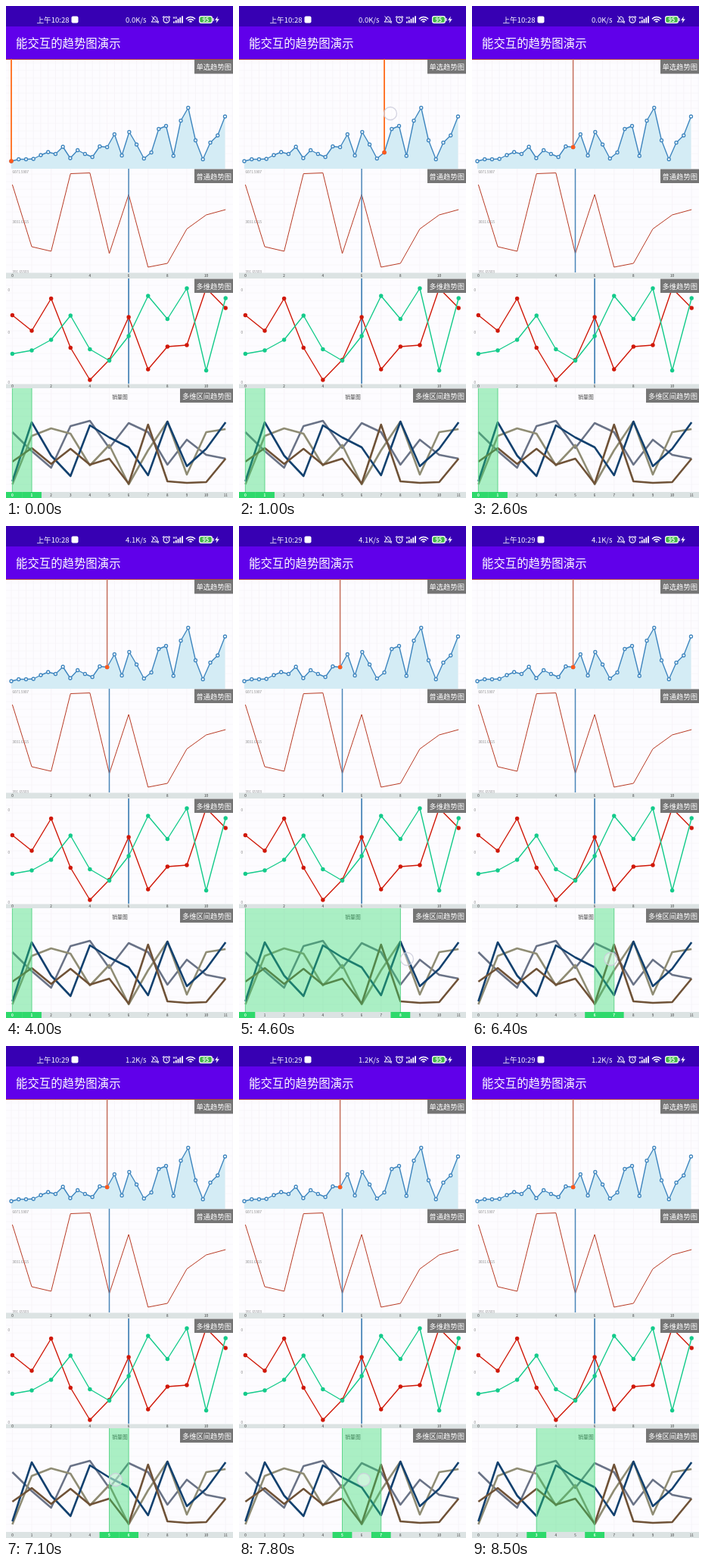
Recreate the animation shown at these times as an HTML page with a canvas. Size 300 by 650 pixels, loop 8600 ms.

```html
<!DOCTYPE html>
<html lang="zh">
<head>
<meta charset="utf-8">
<style>
  html, body { margin: 0; width: 100%; height: 100%; overflow: hidden; background: #fdfcff; }
  canvas { display: block; width: 300px; height: 650px; }
</style>
</head>
<body>
<canvas id="stage"></canvas>
<script>
const canvas = document.getElementById('stage');
const ctx = canvas.getContext('2d');
const ratio = window.devicePixelRatio || 1;
canvas.width = 300 * ratio;
canvas.height = 650 * ratio;

const LOOP = 8600, STEP = 100, LAG = 50;
const FONT = '"Noto Sans CJK SC", "Noto Sans CJK", "Noto Sans", sans-serif';
const BLUE = '#3f86bf', ORANGE = '#ff6a18', GREEN = '#2ed96b';

const sales = [205, 202.5, 202.5, 202, 197, 193, 195.5, 186, 201, 190.5, 195.5, 199.5, 185.5, 186.5, 169.5,
  197.5, 166.5, 183, 201.5, 193.5, 162.5, 158.5, 198, 151.5, 134.5, 177.5, 202.5, 180.5, 171, 146];
const plain = [236, 318, 324, 221.5, 220.5, 327, 249, 345, 340, 294.5, 276, 269];
const red = [408.5, 429, 386.5, 451.5, 494, 467.5, 411, 480, 450, 448, 373, 399];
const green = [459.5, 455, 441, 409, 453.5, 468.5, 436, 383, 413.5, 373, 481.5, 386];
const bands = [
  ['#6a7387', [563, 588, 610, 555, 548, 584, 551, 563, 606, 573, 593, 598]],
  ['#8f8c74', [632, 568, 558, 565, 607, 580, 632, 587, 549, 619, 563, 559]],
  ['#12416f', [628, 550, 594, 621, 554, 570, 583, 620, 549, 608, 585, 550]],
  ['#6f5237', [602, 584, 605, 585, 606, 598, 631, 553, 628, 630, 629, 598]]
];

const fineX = i => 7 + i * 9.74;
const wideX = i => 8.4 + i * 25.62;

// Each drag: the handle it moves, the finger's height, and [time, x] stops.
const drags = [
  ['single', 142, [[100, 12], [1000, 200], [1300, 290], [1800, 134]]],
  ['plain', 285, [[1900, 165], [2100, 240], [2350, 75], [2500, 136]]],
  ['multi', 430, [[2800, 163], [3050, 195], [3350, 78], [3600, 162]]],
  ['right', 572, [[4100, 36], [4500, 222], [4600, 222]]],
  ['left', 572, [[4700, 8], [5200, 101], [5500, 101], [6100, 162]]],
  ['right', 572, [[6200, 220], [6500, 165]]],
  ['left', 573, [[6600, 162], [6800, 62], [7100, 145]]],
  ['right', 573, [[7300, 165], [7600, 222], [7800, 165]]],
  ['left', 573, [[7900, 136], [8000, 112], [8300, 86]]]
];

function along(stops, t) {
  if (t <= stops[0][0]) return stops[0][1];
  for (let i = 1; i < stops.length; i++) {
    const [t0, x0] = stops[i - 1], [t1, x1] = stops[i];
    if (t <= t1) return x0 + (x1 - x0) * (t - t0) / (t1 - t0);
  }
  return stops[stops.length - 1][1];
}

function stateAt(t) {
  const state = { single: 0, plain: 6, multi: 6, left: 0, right: 1, finger: null };
  for (const [handle, y, stops] of drags) {
    if (t < stops[0][0]) continue;
    const x = along(stops, t - LAG);
    state[handle] = Math.round(handle === 'single' ? (x - 7) / 9.74 : (x - 8.4) / 25.62);
    if (t <= stops[stops.length - 1][0]) state.finger = [along(stops, t), y];
  }
  return state;
}

function rect(x, y, w, h, color) {
  ctx.fillStyle = color;
  ctx.fillRect(x, y, w, h);
}

function text(str, x, y, size, color, align = 'left', weight = 400) {
  ctx.font = `${weight} ${size}px ${FONT}`;
  ctx.textAlign = align;
  ctx.fillStyle = color;
  ctx.fillText(str, x, y);
}

function line(points, color, width) {
  ctx.beginPath();
  points.forEach(([x, y]) => ctx.lineTo(x, y));
  ctx.strokeStyle = color;
  ctx.lineWidth = width;
  ctx.stroke();
}

function circle(x, y, r, fill, stroke, width = 1) {
  ctx.beginPath();
  ctx.arc(x, y, r, 0, Math.PI * 2);
  if (fill) { ctx.fillStyle = fill; ctx.fill(); }
  if (stroke) { ctx.strokeStyle = stroke; ctx.lineWidth = width; ctx.stroke(); }
}

function roundRect(x, y, w, h, r, fill) {
  ctx.beginPath();
  ctx.roundRect(x, y, w, h, r);
  ctx.fillStyle = fill;
  ctx.fill();
}

const place = (values, xAt) => values.map((y, i) => [xAt(i), y]);

function grid(top, bottom, xAt, count) {
  for (let i = 0; i < count; i++) line([[xAt(i), top], [xAt(i), bottom]], '#f5f3f7', 0.8);
  for (let y = bottom - 10; y > top; y -= 10) line([[0, y], [300, y]], '#f6f4f8', 0.8);
}

function axis(y, height, step) {
  rect(0, y, 300, height, '#dce3e3');
  for (let i = 0; i < 12; i += step) text(i, wideX(i), y + height / 2 + 1.8, 4.6, '#333', 'center');
}

function tag(str, x, y) {
  rect(x, y, 300 - x, 18.5, '#757575');
  text(str, 298, y + 13, 9.3, '#fff', 'right');
}

function statusBar(t) {
  rect(0, 0, 300, 27, '#3700b3');
  rect(0, 27, 300, 43, '#6000ea');
  text(t < 4200 ? '上午10:28' : '上午10:29', 40.5, 21.5, 9.6, '#fff', 'left', 500);
  roundRect(86.5, 13.5, 9, 9, 2, '#fff');
  text((t < 3000 ? '0.0' : t < 6700 ? '4.1' : '1.2') + 'K/s', 158, 21.5, 9.5, '#fff', 'left', 500);

  // muted bell
  line([[192, 21], [194, 19], [194.5, 15.5], [197, 14], [199.5, 15.5], [200, 19], [202, 21], [192, 21]], '#fff', 1);
  line([[192.5, 13.5], [201.5, 23]], '#fff', 1);
  // alarm clock
  circle(212, 18.3, 3.9, null, '#fff', 1.2);
  line([[212, 16], [212, 18.5], [213.7, 19.5]], '#fff', 0.9);
  line([[207, 15.3], [209.2, 13.4]], '#fff', 1.2);
  line([[214.8, 13.4], [217, 15.3]], '#fff', 1.2);
  // signal
  text('HD', 220.5, 17, 4, '#fff', 'left', 700);
  for (let i = 0; i < 5; i++) rect(221 + i * 2.8, 20.5 - i * 1.8, 1.8, 2 + i * 1.8, '#fff');
  // wifi
  for (const r of [2, 5, 8]) {
    ctx.beginPath();
    ctx.arc(244, 22.5, r, -Math.PI * 0.77, -Math.PI * 0.23);
    ctx.strokeStyle = '#fff';
    ctx.lineWidth = 1.6;
    ctx.stroke();
  }
  // battery
  roundRect(255, 13, 18, 10, 3, '#fff');
  roundRect(256.2, 14.2, 15.6, 7.6, 2, '#43b649');
  rect(273.4, 16, 1.3, 4, '#fff');
  text('95', 264, 20.7, 7, '#fff', 'center', 700);
  ctx.beginPath();
  [[280, 13.5], [276, 18.7], [278.6, 18.7], [277.6, 22.8], [281.8, 17.3], [279, 17.3]].forEach(p => ctx.lineTo(...p));
  ctx.fillStyle = '#fff';
  ctx.fill();

  text('能交互的趋势图演示', 13, 55, 15.4, '#fff', 'left', 500);
}

function singleChart(index, active) {
  grid(71, 215, fineX, 31);
  const points = place(sales, fineX);
  ctx.beginPath();
  [[7, 215], ...points, [289.5, 215]].forEach(p => ctx.lineTo(...p));
  ctx.fillStyle = '#d4ecf5';
  ctx.fill();
  line(points, BLUE, 1.4);
  points.forEach(([x, y]) => circle(x, y, 2, '#fff', BLUE, 1.3));
  rect(0, 70, 300, 1, '#b23a3c');
  const [x, y] = points[index];
  line([[x, 70], [x, y]], active ? ORANGE : '#c4705c', active ? 1.8 : 1.5);
  circle(x, y, 2.8, '#ff5a1c');
  tag('单选趋势图', 249, 71);
}

function plainChart(index) {
  grid(215, 352, wideX, 12);
  text('6071.5907', 8.5, 221, 4.6, '#888');
  text('3031.6315', 8.5, 287, 4.6, '#888');
  text('391.65503', 8.5, 353, 4.6, '#888');
  line(place(plain, wideX), '#b83a24', 1);
  line([[wideX(index), 215], [wideX(index), 352]], '#4b86b8', 1.5);
  axis(352.5, 7.5, 2);
  tag('普通趋势图', 249, 215.5);
}

function multiChart(index) {
  grid(360, 499, wideX, 12);
  for (const y of [376.5, 432.5, 499]) text('0', 2.5, y, 4.6, '#888');
  line([[wideX(index), 360], [wideX(index), 499]], '#4b86b8', 1.8);
  for (const [color, values] of [['#d01808', red], ['#14cb8b', green]]) {
    const points = place(values, wideX);
    line(points, color, 1.4);
    points.forEach(([x, y]) => circle(x, y, 2.7, color));
  }
  axis(499.5, 5.5, 2);
  tag('多维趋势图', 249, 360.5);
}

function rangeChart(left, right) {
  grid(505, 642, wideX, 12);
  text('销量图', 150.5, 519, 6.8, '#444', 'center', 500);
  for (const [color, values] of bands) line(place(values, wideX), color, 2.6);
  const x0 = wideX(left), x1 = wideX(right);
  rect(x0, 505, x1 - x0, 137, 'rgba(46, 217, 107, 0.4)');
  for (const x of [x0, x1]) line([[x, 505], [x, 642]], '#62d68d', 1);
  axis(642, 8, 1);
  for (const i of [left, right]) {
    rect(wideX(i) - 12.9, 642, 25.8, 8, GREEN);
    text(i, wideX(i), 647.8, 4.8, '#fff', 'center', 700);
  }
  tag('多维区间趋势图', 230, 505.5);
}

function draw(now) {
  const t = Math.floor((now % LOOP) / STEP) * STEP;
  const state = stateAt(t);
  ctx.setTransform(ratio, 0, 0, ratio, 0, 0);
  ctx.lineJoin = 'round';
  rect(0, 0, 300, 650, '#fdfcff');
  singleChart(state.single, t <= 1800);
  plainChart(state.plain);
  multiChart(state.multi);
  rangeChart(state.left, state.right);
  statusBar(t);
  if (state.finger) circle(...state.finger, 8.5, 'rgba(255, 255, 255, 0.4)', 'rgba(205, 205, 220, 0.85)', 1.3);
}

let start;
function tick(now) {
  start ??= now;
  draw(now - start);
  requestAnimationFrame(tick);
}
draw(0);
requestAnimationFrame(tick);
</script>
</body>
</html>
```
